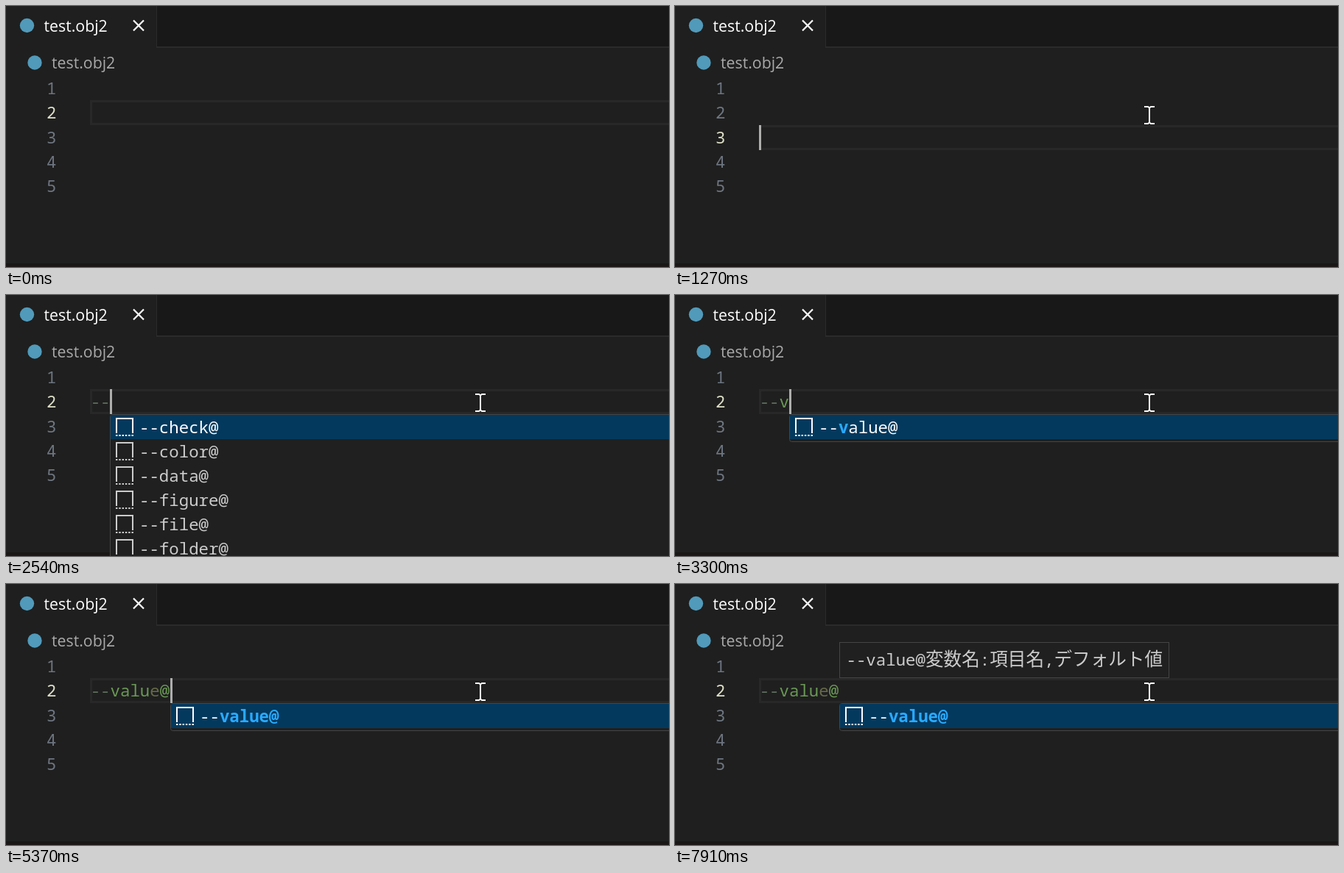
An HTML page for the animation above (8 s loop, 900 by 355 pixels).

```html
<!DOCTYPE html>
<html lang="en">
<head>
<meta charset="utf-8">
<title>Editor completion</title>
<style>
  html, body { margin: 0; width: 100%; height: 100%; overflow: hidden; background: #1f1f1f; }
  svg { display: block; width: 900px; height: 355px; }
  text { white-space: pre; }
  .ui { font: 21.3px "Open Sans", "Noto Sans", sans-serif; }
  .mono { font: 22.4px "Noto Sans Mono", "DejaVu Sans Mono", monospace; }
  .cjk { font: 24.6px "Noto Sans CJK JP", "Noto Sans CJK", sans-serif; }
  .num { fill: #6e7681; text-anchor: middle; }
  .num.on { fill: #dedfc8; }
  .mark { fill: #6a9955; }
  .dash { fill: #5f6f5f; }
  .dim { fill: #666a48; }
  .hit { fill: #2aaaff; font-weight: 700; }
  .icon { fill: none; stroke-width: 2; }
</style>
</head>
<body>
<svg viewBox="0 0 900 355">
  <rect width="900" height="355" fill="#1f1f1f"/>
  <rect x="204" width="696" height="57" fill="#2b2b2b"/>
  <rect x="205" width="695" height="55" fill="#181818"/>
  <rect y="350" width="900" height="5" fill="#1b1717"/>

  <circle cx="28.5" cy="26.5" r="9.7" fill="#519aba"/>
  <text class="ui" x="51.5" y="35" fill="#fff">test.obj2</text>
  <path d="M173 19.5l14 14m0-14l-14 14" stroke="#fff" stroke-width="2.2"/>
  <circle cx="39" cy="77" r="9.7" fill="#519aba"/>
  <text class="ui" x="62" y="85" fill="#a9a9a9">test.obj2</text>

  <path id="line" d="M902 129.5H115.5V160.5H902" fill="none" stroke="#282828" stroke-width="3"/>
  <g id="nums" class="mono"></g>
  <text id="code" class="mono" x="114.7" y="153"></text>
  <g id="list" class="mono"></g>
  <rect id="caret" width="3" height="34" fill="#aeafad"/>

  <g id="tip">
    <rect x="223.5" y="79.5" width="447" height="48" fill="#202020" stroke="#454545"/>
    <text class="mono" x="232.5" y="111" fill="#ccc">--value@<tspan class="cjk">変数名</tspan>:<tspan class="cjk">項目名</tspan>,<tspan class="cjk">デフォルト値</tspan></text>
  </g>

  <path id="mouse" d="M-7-11H-2L0-9.5L2-11H7M0-10V10M-7 12H-2L0 10.5L2 12H7" fill="none" stroke="#fff" stroke-width="2"/>
</svg>
<script>
  const LOOP = 8000, BLINK = 505, TICK = 65, ROW = 33;
  const WORD = 'value@';
  const ITEMS = ['check', 'color', 'data', 'figure', 'file', 'folder'].map(s => `--${s}@`);

  const clicks = [910, 1480];
  const keys = [2400, 2540, 3300, 3360, 4240, 4510, 4780, 5370];
  const inputs = [...clicks, ...keys];
  const TIP = 5500;

  // pointer moves, each in a straight line from where the last one ended
  const moves = [
    { from: 130, to: 260, x: 688, y: 235 },
    { from: 560, to: 950, x: 648, y: 166 },
    { from: 1140, to: 1270, x: 644, y: 148 },
    { from: 1345, to: 1410, x: 655, y: 136 },
    { from: 1415, to: 1480, x: 644, y: 146 }
  ];

  const $ = id => document.getElementById(id);
  const show = (id, on) => { $(id).style.display = on ? '' : 'none'; };
  const span = (cls, s) => `<tspan class="${cls}">${s}</tspan>`;
  const column = n => Math.round(114 + 13.6 * n);

  $('nums').innerHTML = [1, 2, 3, 4, 5]
    .map(n => `<text class="num" x="61.8" y="${Math.round(86.8 + n * 33.25)}">${n}</text>`).join('');
  const nums = [...$('nums').children];

  function pointer(t) {
    let x = 739, y = 295;
    for (const m of moves) {
      if (t < m.from) break;
      const done = Math.floor((t - m.from) / TICK) * TICK;
      const p = Math.min(1, done / (m.to - m.from));
      x += (m.x - x) * p;
      y += (m.y - y) * p;
    }
    return `translate(${x} ${y})`;
  }

  // every input restarts the blink with the caret visible
  function caretOn(t) {
    const last = inputs.findLast(k => k <= t);
    return last !== undefined && Math.floor((t - last) / BLINK) % 2 === 0;
  }

  function codeText(n) {
    if (n < 2) return `<tspan fill="#ccc">${'-'.repeat(n)}</tspan>`;
    const word = WORD.slice(0, n - 2);
    return span('dash', '--') + span('mark', word.slice(0, 4)) +
      span('dim', word.slice(4, 5)) + span('mark', word.slice(5));
  }

  function row(label, i) {
    const y = i * ROW, color = i ? '#ccc' : '#fff';
    return (i ? '' : `<rect x="1" y="1" width="900" height="${ROW}" fill="#04395e"/>`) +
      `<path class="icon" d="M9 ${y + 26}V${y + 6}H31V${y + 26}" stroke="${color}"/>` +
      `<path class="icon" d="M8 ${y + 29}H32" stroke="${color}" stroke-dasharray="2.4 1.9"/>` +
      `<text x="40" y="${y + 26}" fill="${color}">${label}</text>`;
  }

  function listRows(n) {
    if (n < 2) return '';
    const k = n - 2;
    const labels = k ? ['--' + span('hit', WORD.slice(0, k)) + WORD.slice(k)] : ITEMS;
    return `<rect x=".5" y=".5" width="920" height="${labels.length * ROW + 4}" rx="3" fill="#202020" stroke="#454545"/>` +
      labels.map(row).join('');
  }

  let shown = -1;
  function draw(t) {
    const n = keys.filter(k => k <= t).length;
    const line = t >= clicks[0] && t < clicks[1] ? 3 : 2;
    const top = line === 2 ? 128 : 162;

    if (n !== shown) {
      shown = n;
      $('code').innerHTML = codeText(n);
      $('list').innerHTML = listRows(n);
      $('list').setAttribute('transform', `translate(${column(n)} 162)`);
    }
    nums.forEach((el, i) => el.classList.toggle('on', i + 1 === line));
    $('line').setAttribute('transform', `translate(0 ${top - 128})`);
    $('caret').setAttribute('x', column(n));
    $('caret').setAttribute('y', top);
    $('mouse').setAttribute('transform', pointer(t));
    show('caret', caretOn(t));
    show('tip', t >= TIP);
    show('mouse', t >= moves[0].from);
  }

  const start = performance.now();
  function tick() {
    draw((performance.now() - start) % LOOP);
    requestAnimationFrame(tick);
  }
  tick();
</script>
</body>
</html>
```
